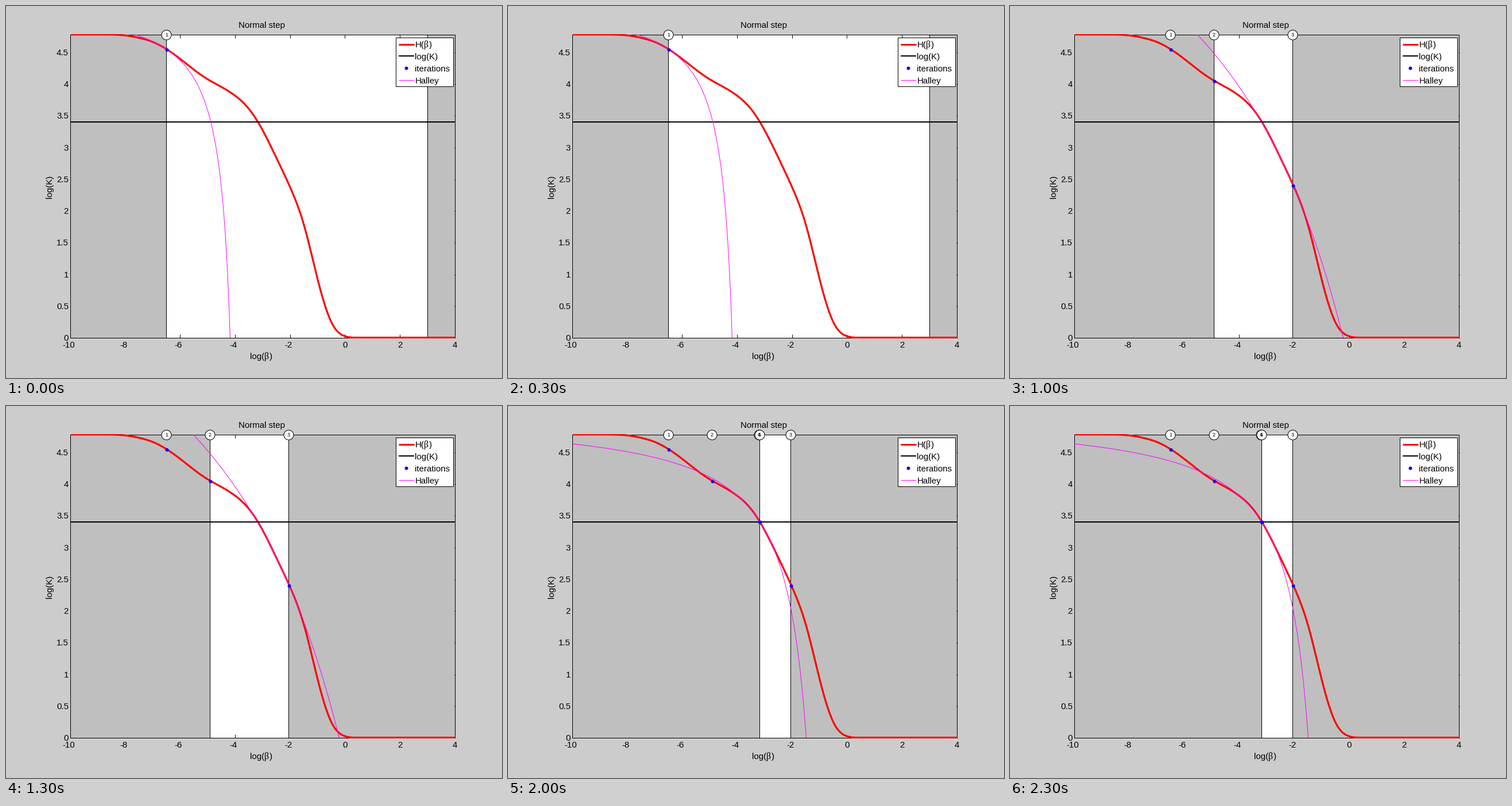
Animation of 864 by 648 pixels, one loop 2.5 s. Source, as a matplotlib script:

```python
import numpy as np
import matplotlib.pyplot as plt
from matplotlib.animation import FuncAnimation
from matplotlib.patches import Rectangle

plt.rcParams.update({
    "font.family": "Liberation Sans",
    "font.size": 15,
    "lines.solid_capstyle": "butt",
})

W, H = 864, 648
LEFT, RIGHT, TOP, BOTTOM = 112, 782, 49, 577
GOAL = 201.5
GRAY = "0.75"

fig = plt.figure(figsize=(W / 72, H / 72), dpi=72, facecolor="0.8")
ax = fig.add_axes([0, 0, 1, 1])
# Whole numbers fall just short of pixel centres, so thin lines snap to them
ax.set_xlim(-0.4, W - 0.4)
ax.set_ylim(H - 0.6, -0.6)
ax.axis("off")


def px(x):
    return LEFT + 0.5 + (x + 10) * 47.82


def py(y):
    return BOTTOM - y * 110.45


def line(xs, ys, color="black", lw=1, z=1, **kw):
    return ax.plot(xs, ys, color=color, lw=lw, zorder=z, **kw)[0]


def label(x, y, s, ha="left", **kw):
    return ax.text(x, y, s, ha=ha, va="baseline", zorder=11, **kw)


def beta_label(x, y, head, beta_x):
    label(x, y, head)
    label(beta_x, y, "β", family="Liberation Serif", size=16)
    label(beta_x + 9, y, ")")


def box(x0, y0, x1, y1, z, fc, ec="black"):
    return ax.add_patch(Rectangle((x0, y0), x1 - x0, y1 - y0, lw=1, zorder=z,
                                  fc=fc, ec=ec))


def clip(artist, pad=0):
    artist.set_clip_path(Rectangle((LEFT, TOP - pad), RIGHT - LEFT + pad,
                                   BOTTOM - TOP + 2 * pad, transform=ax.transData))


def spline(start, step, values, x):
    """Natural cubic spline through evenly spaced values, flat outside."""
    v = np.array(values)
    n = len(v)
    bands = 4 * np.eye(n - 2) + np.eye(n - 2, k=1) + np.eye(n - 2, k=-1)
    m = np.zeros(n)
    m[1:-1] = np.linalg.solve(bands, 6 * np.diff(v, 2))
    s = np.clip((x - start) / step, 0, n - 1)
    i = np.minimum(s.astype(int), n - 2)
    b = s - i
    a = 1 - b
    return a * v[i] + b * v[i + 1] + ((a**3 - a) * m[i] + (b**3 - b) * m[i + 1]) / 6


def hyperbola(x0, y0, slope, bend):
    d = np.linspace(LEFT, RIGHT, 2700) - x0
    den = 1 + bend * d
    ok = den > 0.02
    return x0 + d[ok], y0 + slope * d[ok] / den[ok]


# Plot area, ticks and their labels
box(LEFT, TOP, RIGHT, BOTTOM, 0, "white", "none")
for v in range(-10, 5, 2):
    x = int(px(v))
    if -10 < v < 4:
        line([x, x], [TOP, TOP + 6])
        line([x, x], [BOTTOM - 6, BOTTOM])
    label(x - (3.5 if v < 0 else 0), 594, str(v), "center")
for k in range(10):
    y = round(py(k / 2))
    line([RIGHT - 1, RIGHT + 1], [y, y], z=4)
    label(108.5, y + 5, f"{k / 2:g}", "right")

left_shade = box(LEFT, TOP, LEFT, BOTTOM, 2, GRAY)
right_shade = box(RIGHT, TOP, RIGHT, BOTTOM, 2, GRAY)
box(LEFT, TOP, RIGHT, BOTTOM, 3, "none")

label(445, 37, "Normal step", "center")
beta_label(425, 614, "log(", 450)
label(80, 314, "log(K)", "center", rotation=90, rotation_mode="anchor")

# Entropy curve and its goal level
levels = [4.78, 4.778, 4.765, 4.726, 4.66, 4.545, 4.39, 4.22, 4.07, 3.95, 3.81,
          3.60, 3.26, 2.825, 2.36, 1.765, 0.905, 0.235, 0.02, 0, 0]
xs = np.linspace(-10, 4, 1200)
entropy = np.maximum(spline(-9, 0.5, levels, xs), 0)
clip(line(px(xs), py(entropy), "red", 3.2, 4), pad=1)
line([LEFT, RIGHT + 1], [GOAL, GOAL], lw=2, z=5)

# Iterates in pixels, with slope and bend of the osculating hyperbola
steps = [(279.5, 75, 0.669, -0.007716),
         (355.5, 130, 0.5656, 0.0005556),
         (492.9, 312, 2.307, -0.002789),
         (437.5, 201, 1.5223, -0.008374),
         (438.3, 201.4, 1.5426, -0.008278)]

halley = line([], [], "magenta", 1, 6)
clip(halley)
dots = line([], [], "blue", 0, 7, marker="o", ms=6, mew=0)
rings = line([], [], lw=0, z=7, marker="o", ms=17, mfc="white", mec="black", mew=1)
digits = [label(int(s[0]), TOP + 3, str(i + 1), "center", size=9)
          for i, s in enumerate(steps)]

# Legend
box(679, 54, 779, 139, 9, "white")
line([684, 711], [66, 66], "red", 3, 10)
line([684, 711], [86.5, 86.5], "black", 2, 10)
line([697], [107], "blue", 0, 10, marker="o", ms=6, mew=0)
line([684, 711], [128, 128], "magenta", 1, 10)
beta_label(712, 71, "H(", 728)
for k, name in enumerate(["log(K)", "iterations", "Halley"]):
    label(712, 92 + 21 * k, name)


def update(i):
    seen = steps[:i + 1]
    lo = max(int(s[0]) for s in seen if s[1] < GOAL)
    hi = min([int(s[0]) for s in seen if s[1] > GOAL], default=int(px(3)))
    left_shade.set_width(lo - LEFT)
    right_shade.set_x(hi)
    right_shade.set_width(RIGHT - hi)
    halley.set_data(*hyperbola(*steps[i]))
    dots.set_data([s[0] for s in seen], [s[1] for s in seen])
    rings.set_data([int(s[0]) for s in seen], [TOP] * len(seen))
    for k, digit in enumerate(digits):
        digit.set_visible(k <= i)
    return []


anim = FuncAnimation(fig, update, frames=len(steps), init_func=lambda: update(0),
                     interval=500, repeat=True, repeat_delay=0)
plt.show()
```
